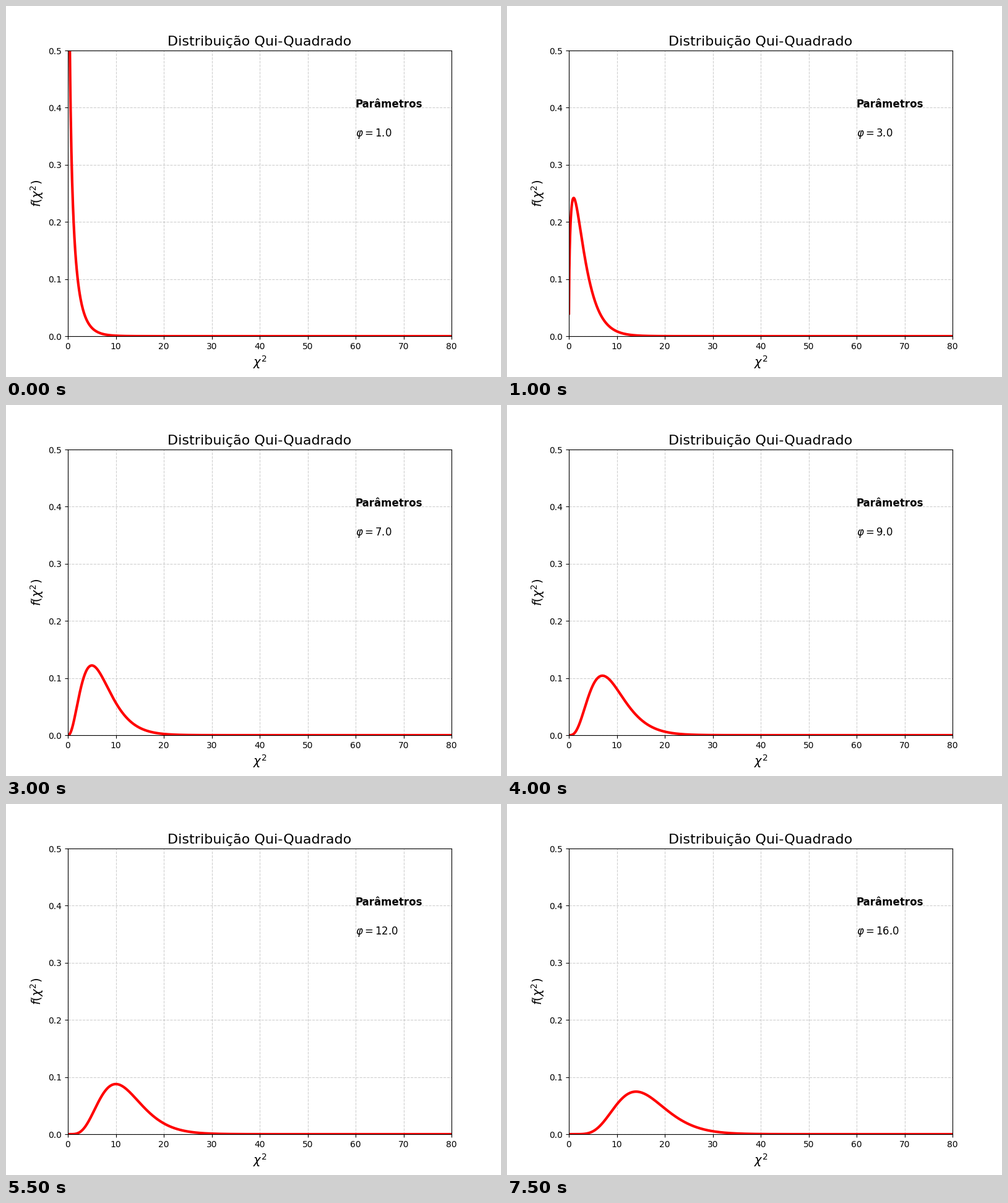
A matplotlib script for the animation above (8 s loop, 800x600 px).

```python
import math

import matplotlib.pyplot as plt
import numpy as np
from matplotlib.animation import FuncAnimation

STEPS = 16
INTERVAL = 500

plt.rcParams["font.family"] = "DejaVu Sans"


def chi2_pdf(x, k):
    half = k / 2
    return x ** (half - 1) * np.exp(-x / 2) / (2 ** half * math.gamma(half))


fig, ax = plt.subplots(figsize=(8, 6), dpi=100)
x = np.linspace(0.01, 80, 1000)

ax.set_xlim(0, 80)
ax.set_ylim(0, 0.5)
ax.set_title("Distribuição Qui-Quadrado", fontsize=16)
ax.set_xlabel(r"$\chi^2$", fontsize=14)
ax.set_ylabel(r"$f(\chi^2)$", fontsize=14)
ax.grid(linestyle="--", alpha=0.6)

ax.text(60, 0.4, "Parâmetros", fontsize=12, fontweight="bold")
label = ax.text(60, 0.35, "", fontsize=12)
curve, = ax.plot([], [], color="red", lw=3)


def update(i):
    k = i + 1.0
    curve.set_data(x, chi2_pdf(x, k))
    label.set_text(rf"$\varphi = {k:.1f}$")
    return curve, label


anim = FuncAnimation(fig, update, frames=STEPS, interval=INTERVAL,
                     repeat=True, repeat_delay=0)
plt.show()
```
